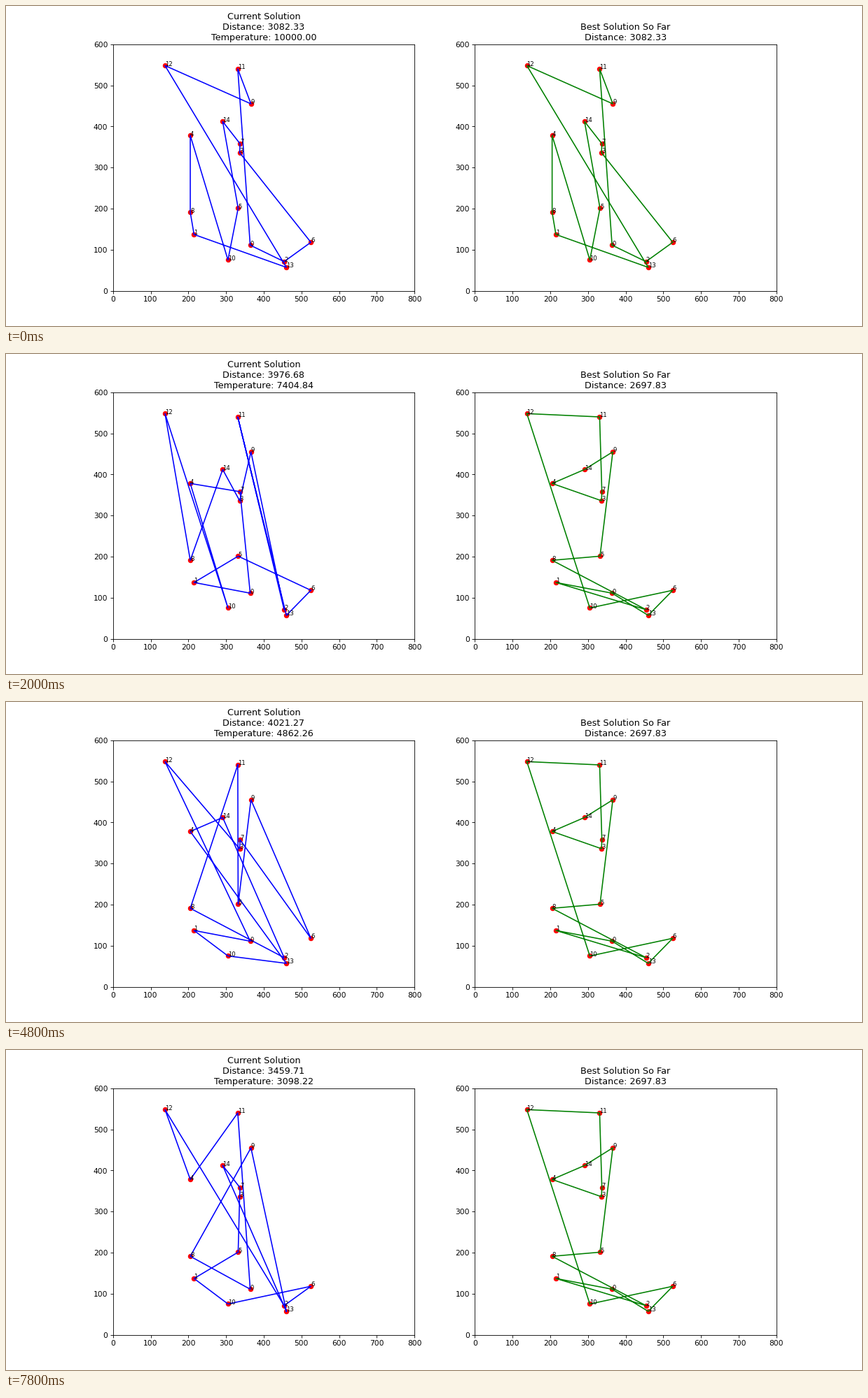
A matplotlib script that plays this animation: 1222x458 px, repeating every 8000 ms.

```python
import math
import random

import matplotlib.pyplot as plt
from matplotlib.animation import FuncAnimation

FRAMES, INTERVAL = 40, 200
T_START, COOLING, STEPS = 10000, 0.997, 10
BEST_FOUND = 2  # frame at which the best route turns up

CITIES = [(364, 111), (215, 137), (454, 71), (336, 336), (205, 378),
          (332, 201), (525, 118), (337, 358), (205, 191), (366, 455),
          (305, 75), (331, 540), (138, 548), (460, 57), (291, 412)]

# Routes with their lengths
START = [0, 2, 6, 3, 7, 14, 5, 10, 4, 8, 1, 13, 12, 9, 11], 3082.33
BEST = [12, 11, 7, 3, 4, 14, 9, 5, 8, 2, 1, 0, 13, 6, 10], 2697.83


def length(tour):
    return sum(math.dist(CITIES[a], CITIES[b])
               for a, b in zip(tour, tour[1:] + tour[:1]))


def temperature(frame):
    return T_START * COOLING ** (STEPS * frame)


def best_at(frame):
    return BEST if frame >= BEST_FOUND else START


def anneal(tour, temp, floor, rng):
    """Swap random city pairs, accepting by the Metropolis rule."""
    for _ in range(STEPS):
        trial = tour[:]
        i, j = rng.sample(range(len(tour)), 2)
        trial[i], trial[j] = trial[j], trial[i]
        gain = length(tour) - length(trial)
        if length(trial) > floor and rng.random() < math.exp(min(0, gain / temp)):
            tour = trial
    return tour, length(tour)


def search():
    rng = random.Random(7)
    states = [START]
    for frame in range(1, FRAMES):
        floor = best_at(frame)[1]
        states.append(anneal(states[-1][0], temperature(frame), floor, rng))
    return states


def setup(ax, color):
    ax.set_xlim(0, 800)
    ax.set_ylim(0, 600)
    ax.scatter(*zip(*CITIES), c="red")
    for i, (x, y) in enumerate(CITIES):
        ax.text(x, y, str(i), fontsize=8)
    return ax.plot([], [], color=color)[0]


def show(line, tour):
    line.set_data(*zip(*[CITIES[i] for i in tour + tour[:1]]))


plt.rcParams["font.family"] = "DejaVu Sans"
# 16 x 6 inches at this dpi gives 1222 x 458 pixels
fig, (left, right) = plt.subplots(1, 2, figsize=(16, 6), dpi=1222 / 16)
current_line = setup(left, "blue")
best_line = setup(right, "green")
STATES = search()


def update(frame):
    tour, dist = STATES[frame]
    show(current_line, tour)
    left.set_title(f"Current Solution\nDistance: {dist:.2f}\n"
                   f"Temperature: {temperature(frame):.2f}")
    tour, dist = best_at(frame)
    show(best_line, tour)
    right.set_title(f"Best Solution So Far\nDistance: {dist:.2f}")
    return current_line, best_line


anim = FuncAnimation(fig, update, frames=FRAMES, interval=INTERVAL,
                     repeat=True, repeat_delay=0, blit=False)
plt.show()
```
